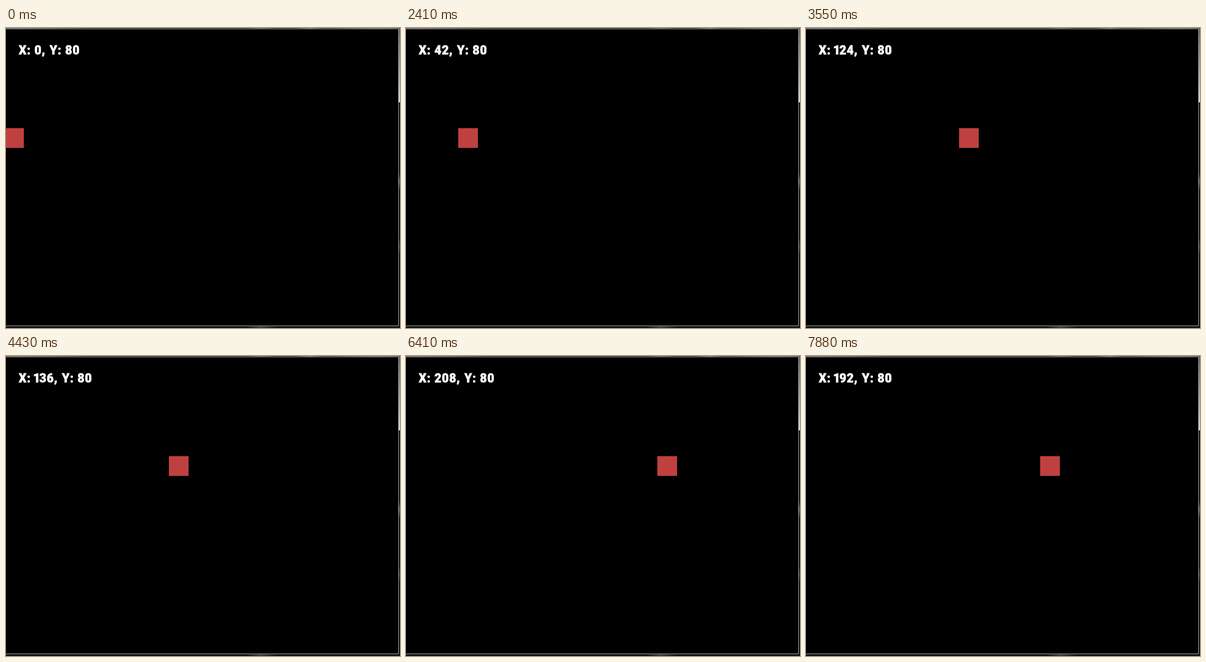
Animation of 641x488 px, one loop 8 s. Source, as an HTML page with a canvas:

```html
<!DOCTYPE html>
<html lang="en">
<head>
<meta charset="utf-8">
<title>Grid movement</title>
<style>
  html, body { margin: 0; width: 100%; height: 100%; overflow: hidden; background: #000; }
  canvas { display: block; }
</style>
</head>
<body>
<canvas id="stage" width="641" height="488"></canvas>
<script>
const ctx = document.getElementById('stage').getContext('2d');
const LOOP = 8000;
const REDRAW = 30;  // ms between redraws while moving
const STEP = 2;     // units moved per tick
const SCALE = 2;    // pixels per unit

const moves = [
  { start: 900, end: 1030, to: 16 },
  { start: 1670, end: 1840, to: 32 },
  { start: 2270, end: 2470, to: 48 },
  { start: 2840, end: 3850, to: 144 },
  { start: 4430, end: 4550, to: 128, first: 5 },
  { start: 4860, end: 5010, to: 144 },
  { start: 5220, end: 6000, to: 208 },
  { start: 6410, end: 6650, to: 192 }
];

const slowDown = p => p + 0.53 * p * (1 - p);

// The label shows the position one tick behind the square.
function stateAt(t) {
  let x = 0, label = 0;
  for (const { start, end, to, first = 1 } of moves) {
    if (t < start) break;
    const elapsed = Math.floor((t - start) / REDRAW) * REDRAW;
    const p = t >= end ? 1 : elapsed / (end - start);
    const ticks = Math.abs(to - x) / STEP;
    const dir = Math.sign(to - x) * STEP;
    const tick = Math.floor(first + (ticks + 1 - first) * slowDown(p));
    label = x + dir * (tick - 1);
    x += dir * Math.min(tick, ticks);
  }
  return { x, label };
}

function rect(color, x, y, w, h) {
  ctx.fillStyle = color;
  ctx.fillRect(x, y, w, h);
}

function glow(x, y, r, alpha) {
  const g = ctx.createRadialGradient(x, y, 0, x, y, r);
  g.addColorStop(0, `rgba(200, 200, 200, ${alpha})`);
  g.addColorStop(1, 'rgba(200, 200, 200, 0)');
  rect(g, x - r, y - r, 2 * r, 2 * r);
}

const sideLight = ctx.createLinearGradient(0, 0, 0, 121);
sideLight.addColorStop(0, '#606060');
sideLight.addColorStop(1, '#d8d8d8');

// A blurred backdrop peeks out around the black window.
function drawWindow() {
  rect('#141414', 0, 0, 641, 488);
  glow(20, 0, 120, 0.45);
  glow(415, 0, 25, 0.3);
  glow(495, 0, 25, 0.5);
  glow(600, 0, 90, 0.5);
  rect(sideLight, 639, 0, 2, 121);
  glow(641, 250, 14, 0.4);
  glow(641, 355, 14, 0.2);
  glow(415, 488, 25, 0.25);
  rect('#909090', 0, 1, 639, 484);
  rect('#000', 0, 2, 638, 482);
}

function advance(ch) {
  if (ch === '1') return 8;
  if (/\d/.test(ch)) return 12;
  return /[XY]/.test(ch) ? 14 : 6;
}

function drawLabel(text, x, y) {
  ctx.font = '900 19.5px Roboto, "Liberation Sans", sans-serif';
  ctx.textAlign = 'center';
  ctx.fillStyle = ctx.strokeStyle = '#fff';
  ctx.lineWidth = 0.6;
  for (const ch of text) {
    const w = advance(ch);
    const mid = x + w / 2 - 1;
    ctx.fillText(ch, mid, y);
    ctx.strokeText(ch, mid, y);
    x += w;
  }
}

function draw() {
  const { x, label } = stateAt(performance.now() % LOOP);
  drawWindow();
  rect('#c04040', x * SCALE - 3, 163, 32, 32);
  drawLabel(`X: ${label}, Y: 80`, 21, 43);
  requestAnimationFrame(draw);
}
draw();
</script>
</body>
</html>
```
